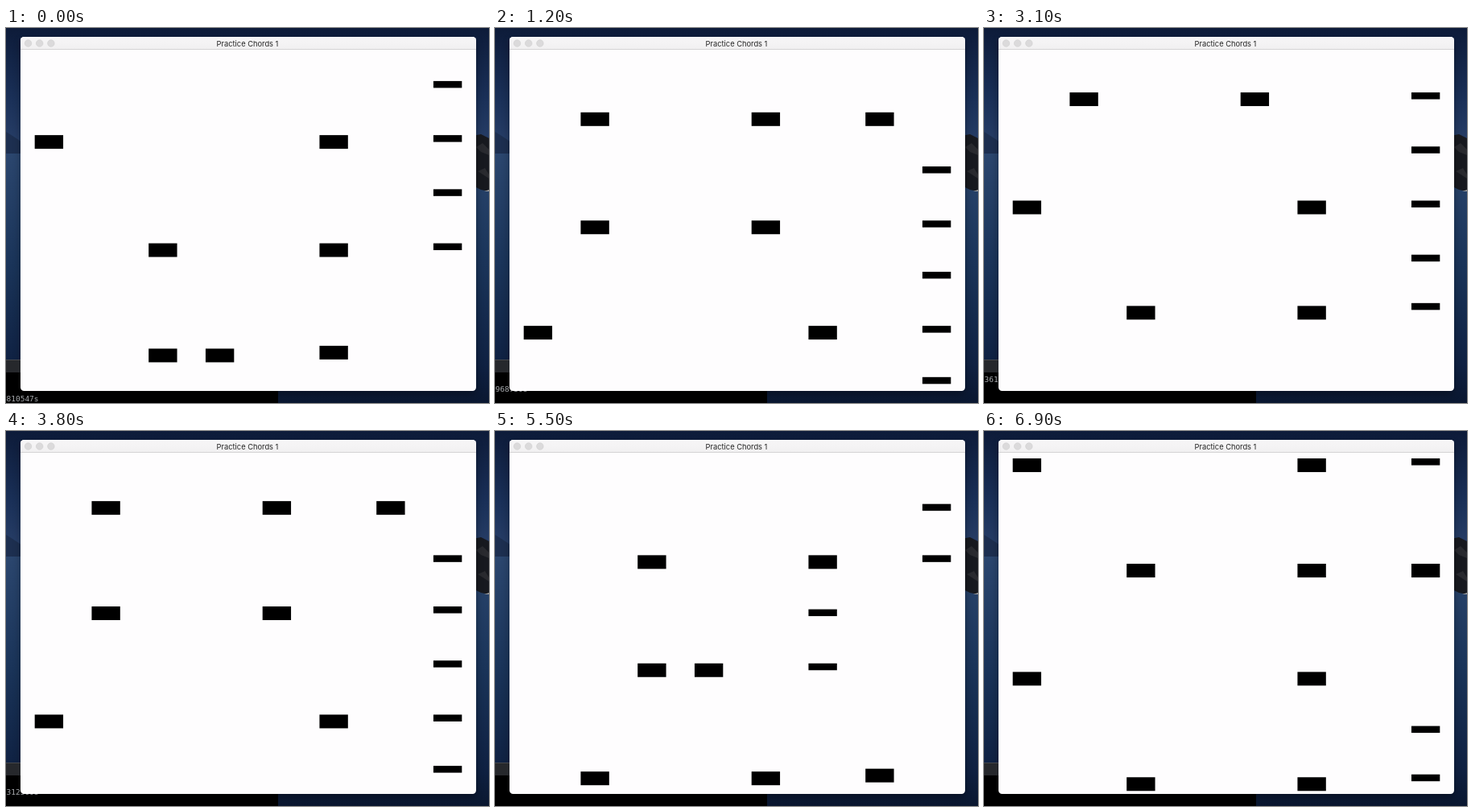
An HTML page that plays this animation: 600x466 px, repeating every 7000 ms.

```html
<!DOCTYPE html>
<html lang="en">
<head>
<meta charset="utf-8">
<title>Practice Chords 1</title>
<style>
html, body { margin: 0; width: 100%; height: 100%; overflow: hidden; background: #0c1730; }
svg { display: block; }
.title { font: 9.3px Inter, "Open Sans", sans-serif; fill: #262626; }
.log { font: 9.5px "DejaVu Sans Mono", monospace; fill: #a9acb0; }
</style>
</head>
<body>
<svg width="600" height="466" viewBox="0 0 600 466">
  <defs>
    <linearGradient id="sky" x2="0" y2="1">
      <stop offset="0" stop-color="#0d1b39"/>
      <stop offset=".55" stop-color="#1a3058"/>
      <stop offset="1" stop-color="#2b426b"/>
    </linearGradient>
    <linearGradient id="sea" x2="0" y2="1">
      <stop offset="0" stop-color="#2b466e"/>
      <stop offset=".45" stop-color="#1a3459"/>
      <stop offset=".85" stop-color="#0f2142"/>
      <stop offset="1" stop-color="#0a1730"/>
    </linearGradient>
    <linearGradient id="bar" x2="0" y2="1">
      <stop offset="0" stop-color="#f7f6f7"/>
      <stop offset="1" stop-color="#f1f0f1"/>
    </linearGradient>
    <clipPath id="pane"><rect x="18" y="11" width="566" height="440" rx="4.5"/></clipPath>
    <filter id="soft" x="-10%" y="-10%" width="120%" height="120%"><feGaussianBlur stdDeviation="5"/></filter>
  </defs>

  <rect width="600" height="160" fill="url(#sky)"/>
  <rect y="155" width="600" height="311" fill="url(#sea)"/>
  <path d="M0 129L8 134L20 142V156H0Z" fill="#1d2f50"/>
  <path d="M580 134L590 132L600 137V203L590 201L580 196Z" fill="#17191f"/>
  <path d="M584 148L592 143L600 151V158L590 154ZM586 178L595 174L600 182V187Z" fill="#292a2f"/>
  <path d="M594 203l6-2v2z" fill="#9a9ca0"/>
  <rect x="18" y="15" width="566" height="440" rx="5" fill="#000" opacity=".35" filter="url(#soft)"/>

  <rect y="412" width="338" height="54" fill="#000"/>
  <rect y="412" width="338" height="16" fill="#26282c"/>
  <rect y="412" width="338" height="1" fill="#45474b"/>
  <g id="log" class="log"></g>

  <g clip-path="url(#pane)">
    <rect x="18" y="11" width="566" height="440" fill="#fefdfe"/>
    <g id="tiles"></g>
    <rect x="18" y="11" width="566" height="16" fill="url(#bar)"/>
    <rect x="18" y="26" width="566" height="1" fill="#d4d3d4"/>
  </g>
  <g fill="#dbdadb" stroke="#cbcacb" stroke-width=".5">
    <circle cx="27.5" cy="19" r="4.3"/>
    <circle cx="41.7" cy="19" r="4.3"/>
    <circle cx="55.9" cy="19" r="4.3"/>
  </g>
  <text class="title" x="300" y="22.7" text-anchor="middle">Practice Chords 1</text>
</svg>
<script>
const LOOP = 7000, TICK = 100, STEPS_PER_TICK = 5.58;
const START = -124, LAST = 120, UNIT = 0.7075;

// Spawn step and lanes; "t" marks a thin tile.
const song = [
  [-124, "6"], [-105, "5 3 2"], [-68, "7t 5 2"], [-49, "7t"],
  [-30, "7t 5 0"], [-11, "7t"], [7, "7t 4 1"], [26, "7t"],
  [45, "6 4 1"], [83, "7t 5 2"], [101, "7t"], [120, "7t 5 0"],
  [139, "7t"], [158, "7t 4 1"], [176, "7t"], [195, "6 4 1"],
  [233, "5t 3 2"], [252, "5t"], [271, "7t 5 2"], [289, "7t"],
  [308, "5 0"], [346, "7 5 2"], [383, "7t 5 0"]
];

// Console lines; an empty one only scrolls the others up.
const lines = [
  [-30, "810547s"], [7, ""], [26, ""],
  [45, "968750s"], [55, ""], [75, ""], [83, ""],
  [120, "361328s"], [139, ""], [158, ""], [176, ""],
  [195, "312500s"], [203, ""], [222, ""],
  [233, "912109s"], [242, ""], [252, ""], [289, ""],
  [308, "507812s"], [348, ""], [365, ""], [383, ""]
];

const spawns = new Map(song.map(([step, row]) => [step, row.split(" ")]));
const tileBox = document.getElementById("tiles");
const logBox = document.getElementById("log");

// A tile that leaves makes its successor miss one step, unseen.
function tilesAt(end) {
  const live = [];
  let seen = [];
  for (let step = START; step <= end; step++) {
    for (const key of spawns.get(step) || []) {
      live.push({ lane: parseInt(key, 10), thin: key.endsWith("t"), n: 0 });
    }
    seen = [];
    for (let i = 0; i < live.length; i++) {
      const tile = live[i];
      seen.push({ ...tile });
      if (++tile.n >= LAST) live.splice(i, 1);
    }
  }
  return seen;
}

function tileMarkup({ lane, thin, n }) {
  const x = 18 + (25 + 100 * lane) * UNIT;
  const y = 27 + 5 * n * UNIT;
  const h = (thin ? 12 : 24) * UNIT;
  return `<rect x="${x}" y="${y}" width="${50 * UNIT}" height="${h}"/>`;
}

function logMarkup(step) {
  return lines.filter(([at]) => at <= step).slice(-3).reverse()
    .map(([, text], i) => `<text x="0.5" y="${463.5 - 12 * i}">${text}</text>`)
    .join("");
}

let shown = -1;
function draw(time) {
  const tick = Math.floor((time % LOOP) / TICK);
  if (tick === shown) return;
  shown = tick;
  const step = Math.round(tick * STEPS_PER_TICK);
  tileBox.innerHTML = tilesAt(step).map(tileMarkup).join("");
  logBox.innerHTML = logMarkup(step);
}

const began = performance.now();
function loop() {
  draw(performance.now() - began);
  requestAnimationFrame(loop);
}
loop();
</script>
</body>
</html>
```
